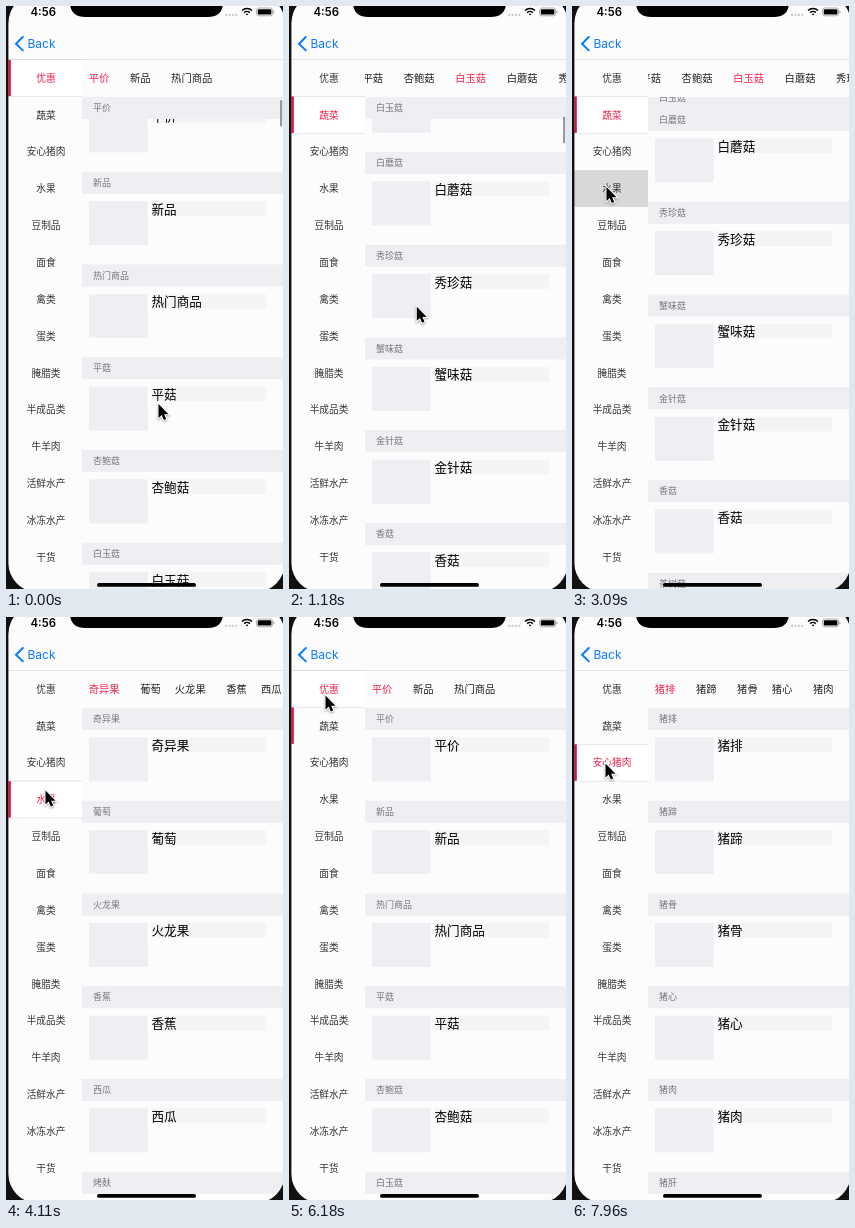
Write an HTML page with a canvas that moves like this. It is 277x583 px and loops after 8 s.

```html
<!DOCTYPE html>
<html lang="zh-CN">
<head>
<meta charset="utf-8">
<style>
html, body { margin: 0; width: 100%; height: 100%; overflow: hidden; background: #111 }
canvas { display: block; width: 277px; height: 583px }
</style>
</head>
<body>
<canvas id="stage"></canvas>
<script>
const canvas = document.getElementById('stage'), c = canvas.getContext('2d');
const dpr = window.devicePixelRatio || 1;
canvas.width = 277 * dpr;
canvas.height = 583 * dpr;

const LOOP = 8000, STEP = 147.1;
const CJK = '"Noto Sans CJK SC", "Noto Sans CJK", sans-serif', UI = 'Inter, sans-serif';
const RED = '#f4244d', GREY = '#eeeef3', PAPER = '#fcfcfc';
const LEFT = 76, TOP = 91, PITCH = 92.75, HEAD = 22, ROW = 36.85, ROW_TOP = 53.6;

const cats = '优惠 蔬菜 安心猪肉 水果 豆制品 面食 禽类 蛋类 腌腊类 半成品类 牛羊肉 活鲜水产 冰冻水产 干货'.split(' ');
// A trailing dash marks a narrower gap after that tab
const groups = [
  '平价 新品 热门商品',
  '平菇 杏鲍菇 白玉菇 白蘑菇 秀珍菇 蟹味菇 金针菇 香菇 茶树菇',
  '猪排 猪蹄 猪骨- 猪心 猪肉 猪肝',
  '奇异果 葡萄- 火龙果 香蕉- 西瓜',
  '烤麸 豆腐'
].map(s => s.split(' '));
const sections = groups.flatMap((g, cat) => g.map((name, i) => ({ name: name.replace('-', ''), cat, i })));
const firstOf = cat => sections.findIndex(s => s.cat === cat);

// [time, category]: the second change comes from scrolling, the others from taps
const picks = [[0, 0], [389, 1], [3440, 3], [5300, 1], [6175, 0], [7710, 2]];
const pointer = [
  [0, 152.5, 398], [200, 157, 350], [590, 158.5, 359.5], [1000, 150, 335], [1450, 85, 235],
  [1910, 37.5, 182], [2200, 29, 184], [2600, 32, 180], [3090, 34.5, 181], [3530, 35, 182],
  [3800, 36, 191], [4110, 39.5, 173.5], [4700, 38, 140], [5150, 37, 108], [5600, 37, 104],
  [6030, 35, 80], [6180, 36.5, 78.5], [6500, 36, 90], [7070, 28, 168], [7510, 33.5, 146.5], [8000, 33.5, 146.5]
];

const clamp = v => Math.min(1, Math.max(0, v));
const ease = v => { v = clamp(v); return v * v * (3 - 2 * v); };

function box(x, y, w, h, color) {
  c.fillStyle = color;
  c.fillRect(x, y, w, h);
}

function pill(x, y, w, h, r, color) {
  c.beginPath();
  c.roundRect(x, y, w, h, r);
  c.fillStyle = color;
  c.fill();
}

// Draws text with its CJK em box centred on cy
function text(s, x, cy, size, color, align = 'left', font = CJK, weight = 400) {
  c.font = `${weight} ${size}px ${font}`;
  c.textAlign = align;
  c.fillStyle = color;
  c.fillText(s, x, cy + size * 0.38);
}

function clipped(x, y, w, h, draw) {
  c.save();
  c.beginPath();
  c.rect(x, y, w, h);
  c.clip();
  draw();
  c.restore();
}

function scrollAt(t) {
  if (t < 3440) return Math.max(18, 545 - 168 * Math.exp((590 - t) / 434));
  const cat = picks.filter(p => p[0] <= t).pop()[1];
  return firstOf(cat) * PITCH;
}

function list(offset, current) {
  const yOf = i => TOP + i * PITCH - offset;
  sections.forEach((s, i) => {
    const y = yOf(i) + 29.4;
    if (y < -40 || y > 620) return;
    box(83, y, 58.7, 44, GREY);
    box(145.5, y, 114.5, 14.8, '#f4f4f6');
    text(s.name, 145.5, y + 7.6, 12.6, '#000');
  });
  sections.forEach((s, i) => {
    if (i < current) return;
    const y = i === current ? Math.min(TOP, yOf(i + 1) - HEAD) : yOf(i);
    box(LEFT, y, 203, HEAD, GREY);
    text(s.name, 87, y + 10.8, 9, '#77777b');
  });
}

function tabs(section, shift) {
  let x = 82.7 - shift;
  groups[section.cat].forEach((raw, i) => {
    const name = raw.replace('-', '');
    text(name, x, 72.2, 10.3, i === section.i ? RED : '#222');
    x += name.length * 10.3 + (raw === name ? 20.6 : 14);
  });
}

function sidebar(t, selected) {
  const rowY = i => ROW_TOP + i * ROW;
  box(0, ROW_TOP, LEFT, 530, PAPER);
  box(0, rowY(selected), LEFT, ROW, '#fff');
  box(0, rowY(selected) - 0.4, LEFT, 0.8, '#e2e2e4');
  box(0, rowY(selected + 1) - 0.4, LEFT, 0.8, '#e2e2e4');
  if (t > 2900 && t < 3440) box(0, rowY(3), LEFT, ROW, '#d8d8d8');
  cats.forEach((name, i) => text(name, 40, rowY(i) + 18.5, 9.7, i === selected ? RED : '#333', 'center'));
  let bar = 0;
  picks.slice(1).forEach(([at, cat], i) => bar += (cat - picks[i][1]) * ease((t - at) / 200));
  box(2.4, rowY(bar), 2.4, ROW - 0.4, '#e20d3a');
}

function navBar() {
  box(0, 0, 279, 53, PAPER);
  box(0, 53, 279, 0.8, '#dedee0');
  c.strokeStyle = '#0a7aff';
  c.lineWidth = 2;
  c.lineCap = 'round';
  c.beginPath();
  c.moveTo(16.8, 31);
  c.lineTo(10, 37.7);
  c.lineTo(16.8, 44.4);
  c.stroke();
  text('Back', 21.5, 37.5, 12, '#0a7aff', 'left', UI);

  text('4:56', 24.5, 6, 11.4, '#000', 'left', UI, 600);
  for (let i = 0; i < 4; i++) pill(219 + i * 3.4, 7.8, 2.2, 2.2, 1.1, '#c8c8ca');
  c.strokeStyle = '#000';
  c.lineWidth = 1.6;
  c.lineCap = 'butt';
  for (const r of [1, 4, 7]) {
    c.beginPath();
    c.arc(241, 9.5, r, -Math.PI * 0.75, -Math.PI * 0.25);
    c.stroke();
  }
  c.strokeStyle = '#999';
  c.lineWidth = 0.8;
  c.beginPath();
  c.roundRect(250.6, 2, 16, 7.8, 2.2);
  c.stroke();
  pill(251.8, 3.2, 13.6, 5.4, 1.2, '#000');
  pill(267.4, 4.6, 1, 2.6, 0.5, '#999');
}

function phone() {
  c.fillStyle = '#111';
  c.beginPath();
  c.rect(0, -20, 290, 620);
  c.roundRect(2.4, -12, 276.4, 598, 29);
  c.fill('evenodd');
  c.fillStyle = '#000';
  c.beginPath();
  c.moveTo(64, -2);
  c.bezierCurveTo(65, 7, 70, 11, 79, 11);
  c.lineTo(202, 11);
  c.bezierCurveTo(211, 11, 216, 7, 217, -2);
  c.fill();
  pill(91, 577, 99, 3.8, 1.9, '#000');
}

function arrow(t) {
  const i = pointer.findIndex(p => p[0] > t), a = pointer[i - 1], b = pointer[i];
  const k = ease((t - a[0]) / (b[0] - a[0]));
  c.save();
  c.translate(a[1] + (b[1] - a[1]) * k, a[2] + (b[2] - a[2]) * k);
  const p = new Path2D('M0 0V14L3.2 11.1L5.3 16L7.7 15L5.6 10.2H10Z');
  c.shadowColor = 'rgba(0,0,0,.35)';
  c.shadowBlur = 2 * dpr;
  c.shadowOffsetY = dpr;
  c.strokeStyle = '#fff';
  c.lineWidth = 2;
  c.stroke(p);
  c.shadowColor = 'transparent';
  c.fillStyle = '#000';
  c.fill(p);
  c.restore();
}

function draw(t) {
  c.setTransform(dpr, 0, 0, dpr, 0, 0);
  box(0, 0, 277, 583, PAPER);
  const offset = scrollAt(t), current = Math.floor(offset / PITCH + 1e-6), section = sections[current];
  clipped(LEFT, TOP, 203, 500, () => list(offset, current));
  if (t < 3440) {
    c.globalAlpha = 1 - clamp((t - 2250) / 300);
    pill(274, 93.5 + offset * 0.0345, 2.2, 26.5, 1.1, '#98989b');
    c.globalAlpha = 1;
  }
  const shift = t < 3440 ? 14.3 * ease((t - 907) / 450) : 0;
  clipped(LEFT, 54, 203, 37, () => tabs(section, shift));
  sidebar(t, section.cat);
  navBar();
  phone();
  arrow(t);
}

// The screen refreshes about seven times a second
let shown = -1;
function frame(now) {
  const tick = Math.floor((now % LOOP + 10) / STEP);
  if (tick !== shown) draw((shown = tick) * STEP);
  requestAnimationFrame(frame);
}
requestAnimationFrame(frame);
</script>
</body>
</html>
```
